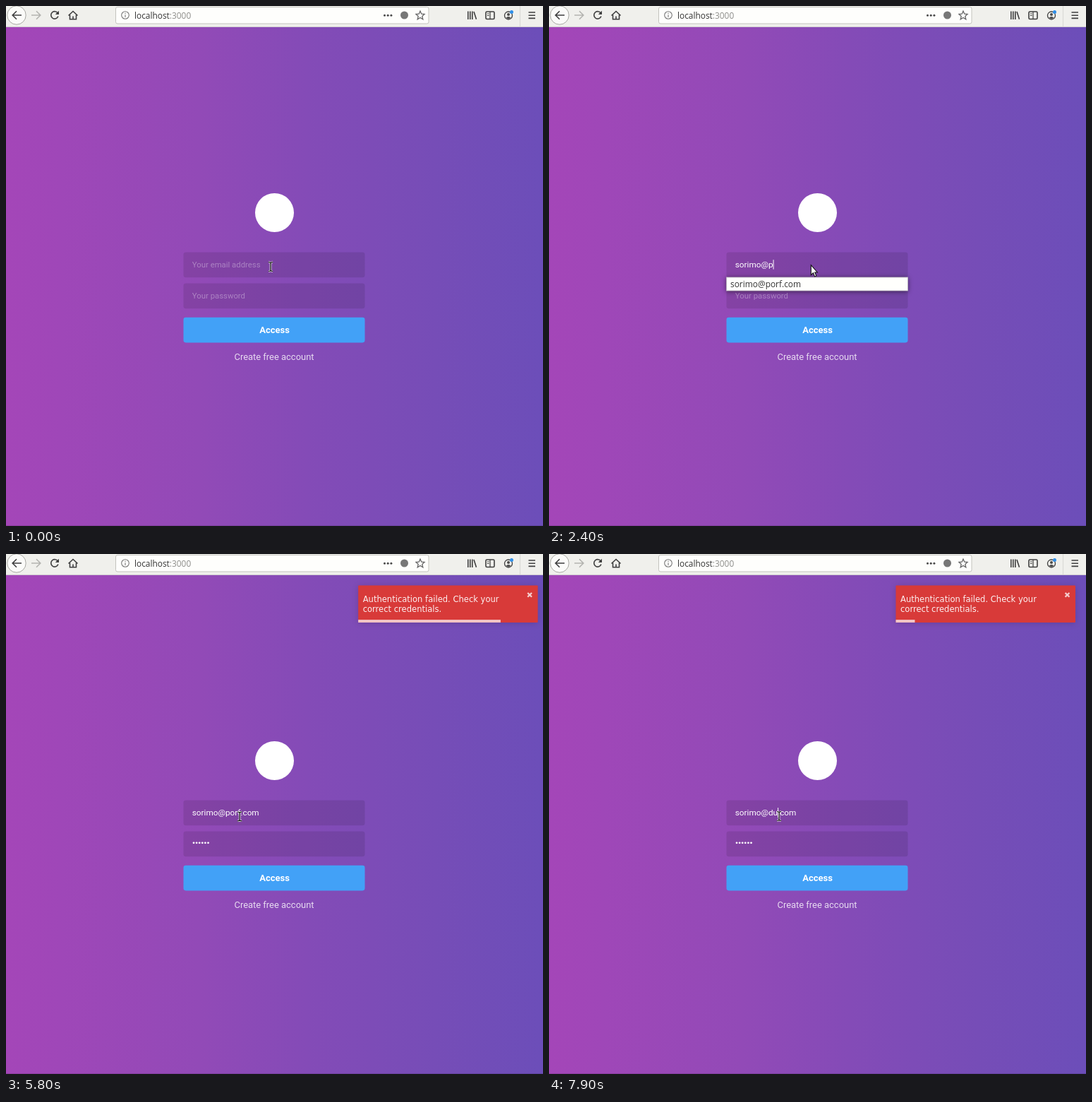
An HTML page for the animation above (8000 ms loop, 761 by 736 pixels).

```html
<!DOCTYPE html>
<html lang="en">
<head>
<meta charset="utf-8">
<title>Sign in</title>
<style>
  html, body { margin: 0; width: 100%; height: 100%; overflow: hidden; }
  svg { display: block; width: 761px; height: 736px; }
  text { font-family: Roboto, sans-serif; white-space: pre; }
  .ui { font: 11.9px "Open Sans", sans-serif; fill: #333; }
  .hint { font-size: 11.35px; fill: #fff; fill-opacity: .34; }
  .value { font-size: 11.75px; fill: #fff; }
  .field { fill: #000; fill-opacity: .1; }
  .icon { fill: none; stroke: #3f3f3f; stroke-width: 1.6; }
  #list rect { fill: #fffffd; stroke: #b9b4bc; stroke-width: .8; filter: drop-shadow(0 1px 3px rgba(0, 0, 0, .5)); }
  #toast .card { fill: #d83a39; filter: drop-shadow(0 1px 4px rgba(0, 0, 0, .15)); }
  #toast text { font: 11.55px "DejaVu Sans", sans-serif; fill: #fff; fill-opacity: .92; }
</style>
</head>
<body>
<svg viewBox="0 0 761 736">
  <defs>
    <linearGradient id="bg">
      <stop offset="0" stop-color="#a446b8"/>
      <stop offset=".1" stop-color="#9f47b8"/>
      <stop offset=".36" stop-color="#924ab7"/>
      <stop offset=".56" stop-color="#844bb7"/>
      <stop offset=".8" stop-color="#764db7"/>
      <stop offset="1" stop-color="#6c4eb9"/>
    </linearGradient>
  </defs>
  <rect y="29" width="761" height="707" fill="url(#bg)"/>
  <rect y="735" width="761" height="1" fill-opacity=".15"/>

  <!-- browser bar -->
  <rect width="761" height="29.5" fill="#f0f0ec"/>
  <path d="M0 29.5H761" stroke="#cfcbd0"/>
  <path d="M728.5 0V29" stroke="#d8d8d4"/>
  <rect x="155.5" y="1.5" width="443.5" height="23.5" rx="2.5" fill="#fefefc" stroke="#c3c3be"/>
  <circle cx="15" cy="13" r="13.2" fill="#fbfbf9" stroke="#a9a9a4"/>
  <g class="icon">
    <path d="M22 13H9.5M15 7.2L9.2 13L15 18.8"/>
    <path d="M36 13H48.500M43 7.200L48.800 13L43 18.800" stroke="#b4b4b0"/>
    <path d="M73.300 10A5.200 5.200 0 1 0 73.900 14.500"/>
    <path d="M75 6.800V12H69.800Z" fill="#3f3f3f" stroke="none"/>
    <path d="M88.500 13.500L95 7.500L101.500 13.500M90.500 12.500V18.700H99.500V12.500M95 18.500V14.500"/>
    <g stroke="#777" stroke-width="1.1">
      <circle cx="169" cy="13" r="5.300"/>
      <path d="M169 12.200V16M169 9.800V11"/>
      <path d="M587 7.200L588.800 11.200L593 11.600L589.800 14.500L590.800 18.800L587 16.500L583.200 18.800L584.200 14.500L581 11.600L585.200 11.200Z" stroke="#666" stroke-width="1.3"/>
    </g>
    <path d="M654.800 7.500V19M657.800 7.500V19M660.800 7.500V19M663 8L666.500 18.700"/>
    <rect x="680" y="8" width="12" height="10.500" rx="1.500"/>
    <path d="M686 8V18.500M682 11H684.500M682 13.500H684.500" stroke-width="1.200"/>
    <circle cx="712" cy="13.500" r="5.500" stroke-width="1.300"/>
    <path d="M740.500 9H750M740.500 13.200H750M740.500 17.400H750"/>
  </g>
  <g fill="#4a4a4a">
    <circle cx="712" cy="12" r="2"/>
    <path d="M708.500 16.500Q712 13.500 715.500 16.500Q712 19.500 708.500 16.500"/>
    <circle cx="536.500" cy="13.200" r="1.500"/>
    <circle cx="541.200" cy="13.200" r="1.500"/>
    <circle cx="545.900" cy="13.200" r="1.500"/>
    <circle cx="564.500" cy="13" r="5.500" fill="#777"/>
  </g>
  <circle cx="716.500" cy="8.500" r="2.500" fill="#2f8fe8"/>
  <text class="ui" x="182" y="17.500">localhost<tspan fill="#8d8d8a">:3000</tspan></text>

  <!-- form -->
  <circle cx="380.500" cy="292.500" r="27.500" fill="#fff"/>
  <rect class="field" x="251.500" y="348.500" width="257" height="35.700" rx="3.300"/>
  <rect class="field" x="251.500" y="392.500" width="257" height="35.700" rx="3.300"/>
  <rect x="251.500" y="440.700" width="257" height="35.700" rx="3.300" fill="#42a1f7"/>
  <text class="hint" id="mailHint" x="263.800" y="370">Your email address</text>
  <text class="hint" id="passHint" x="263.800" y="414">Your password</text>
  <text class="value" id="mail" x="263.800" y="370"></text>
  <g id="dots" fill="#fff"></g>
  <text id="button" x="380.500" y="462.600" text-anchor="middle" font-size="13" font-weight="700" fill="#fff"></text>
  <text x="380" y="501" text-anchor="middle" font-size="12.950" fill="#fff" fill-opacity=".8">Create free account</text>
  <rect id="caret" width="1" height="13.500" fill="#fff"/>
  <g id="list"><rect x="251.500" y="384" width="257"/></g>

  <g id="toast">
    <rect class="card" x="491.500" y="44.500" width="254.500" height="52.500" rx=".8"/>
    <text x="498" y="67.500">Authentication failed. Check your</text>
    <text x="498" y="81.500">correct credentials.</text>
    <path d="M731.600 55L737.400 60.800M737.400 55L731.600 60.800" stroke="#fff" stroke-opacity=".75" stroke-width="2.300"/>
    <rect id="bar" x="491.500" y="93" height="4" fill="#fff" fill-opacity=".7"/>
  </g>

  <g id="beam" fill="none">
    <path id="beamShape" d="M-3 -6.300Q0 -6.300 0 -5Q0 -6.300 3 -6.300M0 -5V5M-3 6.300Q0 6.300 0 5Q0 6.300 3 6.300" stroke="#fff" stroke-opacity=".65" stroke-width="2.600"/>
    <use href="#beamShape"/>
    <path d="M-3 -6.300Q0 -6.300 0 -5Q0 -6.300 3 -6.300M0 -5V5M-3 6.300Q0 6.300 0 5Q0 6.300 3 6.300" stroke="#111" stroke-width="1.300"/>
  </g>
  <path id="arrow" d="M371.300 366.700V380.700L374.400 377.800L376.600 382.900L378.900 381.900L376.700 377H380.300Z" fill="#fff" stroke="#151515" stroke-width="1.100"/>
</svg>
<script>
const LOOP = 8000, STEP = 100;
const $ = id => document.getElementById(id);
const ui = Object.fromEntries(
  ["mailHint", "passHint", "mail", "dots", "button", "caret", "list", "toast", "bar", "beam", "arrow"]
    .map(id => [id, $(id)]));

const USER = "sorimo", ADDRESS = USER + "@porf.com";
const OPTIONS = [USER + "@dulimat.com", ADDRESS, "nardilo" + USER + "@dulimat.com"];
const mailKeys = [800, 900, 1000, 1100, 1200, 1400, 2000, 2300, 2500, 2700, 2800, 2900, 3100, 3200, 3300];
const passKeys = [4100, 4200, 4300, 4500, 4700, 4900];
const eraseKeys = [7100, 7200, 7300, 7400], retypeKeys = [7600, 7800];

// time, x, y of the pointer
const pointer = [[0, 375, 369], [400, 375, 369], [500, 373, 369], [5600, 373, 369],
  [6100, 254, 376], [6300, 254, 376], [6800, 326, 371], [8000, 326, 371]];
// time, offset, opacity of the toast, each leg eased out
const bounce = [[5263, 2448, 0], [5713, -20, 1], [5826, 8, 1], [5938, -4, 1], [6013, 0, 1]];

const easeOut = p => 1 - (1 - p) ** 3;
const easeInOut = p => p * p * (3 - 2 * p);
const pressed = (keys, t) => keys.filter(k => k <= t).length;
const show = (el, on) => el.setAttribute("visibility", on ? "visible" : "hidden");

function sample(track, t, ease) {
  const i = track.findIndex(k => k[0] > t);
  if (i === 0) return track[0].slice(1);
  if (i < 0) return track[track.length - 1].slice(1);
  const a = track[i - 1], b = track[i];
  const p = ease((t - a[0]) / (b[0] - a[0]));
  return a.slice(1).map((v, n) => v + (b[n + 1] - v) * p);
}

function add(parent, tag, attrs) {
  const el = document.createElementNS("http://www.w3.org/2000/svg", tag);
  for (const k in attrs) el.setAttribute(k, attrs[k]);
  return parent.appendChild(el);
}

const dots = passKeys.map((_, i) => add(ui.dots, "circle", { cx: 266 + 4.1 * i, cy: 408.8, r: 1.4 }));
const rows = OPTIONS.map((_, i) => add(ui.list, "text", { class: "ui", x: 257, y: 398.2 + 16.2 * i }));
const listBox = ui.list.querySelector("rect");

function mailState(t) {
  if (t < 6900) {
    const text = ADDRESS.slice(0, pressed(mailKeys, t));
    return { text, at: text.length };
  }
  const typed = pressed(retypeKeys, t);
  const domain = typed ? "du".slice(0, typed) : "porf".slice(0, 4 - pressed(eraseKeys, t));
  const head = USER + "@" + domain;
  return { text: head + ".com", at: head.length };
}

function drawList(t) {
  const open = t >= 900 && t < 3600;
  const query = ADDRESS.slice(0, pressed(mailKeys, t - STEP));
  const found = open ? OPTIONS.filter(o => o.includes(query)) : [];
  rows.forEach((row, i) => { row.textContent = found[i] || ""; });
  listBox.setAttribute("height", found.length * 16.2 + 2.8);
  show(ui.list, open);
  show(ui.arrow, open);
  show(ui.beam, !open);
}

function drawCaret(t, at, count) {
  const inPass = t >= 3600 && t < 6900;
  const x = inPass ? 264 + 4.1 * count
    : 263.8 + (at ? ui.mail.getSubStringLength(0, at) : 0);
  ui.caret.setAttribute("x", x);
  ui.caret.setAttribute("y", inPass ? 403.2 : 359.2);
  show(ui.caret, t >= 400 && !(t >= 5700 && t < 6900));
}

function render(t) {
  const { text, at } = mailState(t);
  const count = pressed(passKeys, t);
  ui.mail.textContent = text;
  show(ui.mailHint, !text);
  show(ui.passHint, !count);
  dots.forEach((d, i) => show(d, i < count));
  ui.button.textContent = t >= 5200 && t < 5500 ? "Loading..." : "Access";
  drawList(t);
  drawCaret(t, at, count);

  const [x, y] = sample(pointer, t, easeInOut);
  ui.beam.setAttribute("transform", `translate(${x} ${y})`);

  const [shift, alpha] = sample(bounce, t, easeOut);
  ui.toast.setAttribute("transform", `translate(${shift} 0)`);
  ui.toast.setAttribute("opacity", alpha);
  ui.bar.setAttribute("width", 254.5 * Math.min(1, (8224 - t) / 3058));
}

const start = performance.now();
function frame() {
  const t = (performance.now() - start) % LOOP;
  render(Math.floor(t / STEP) * STEP);
  requestAnimationFrame(frame);
}
frame();
</script>
</body>
</html>
```
